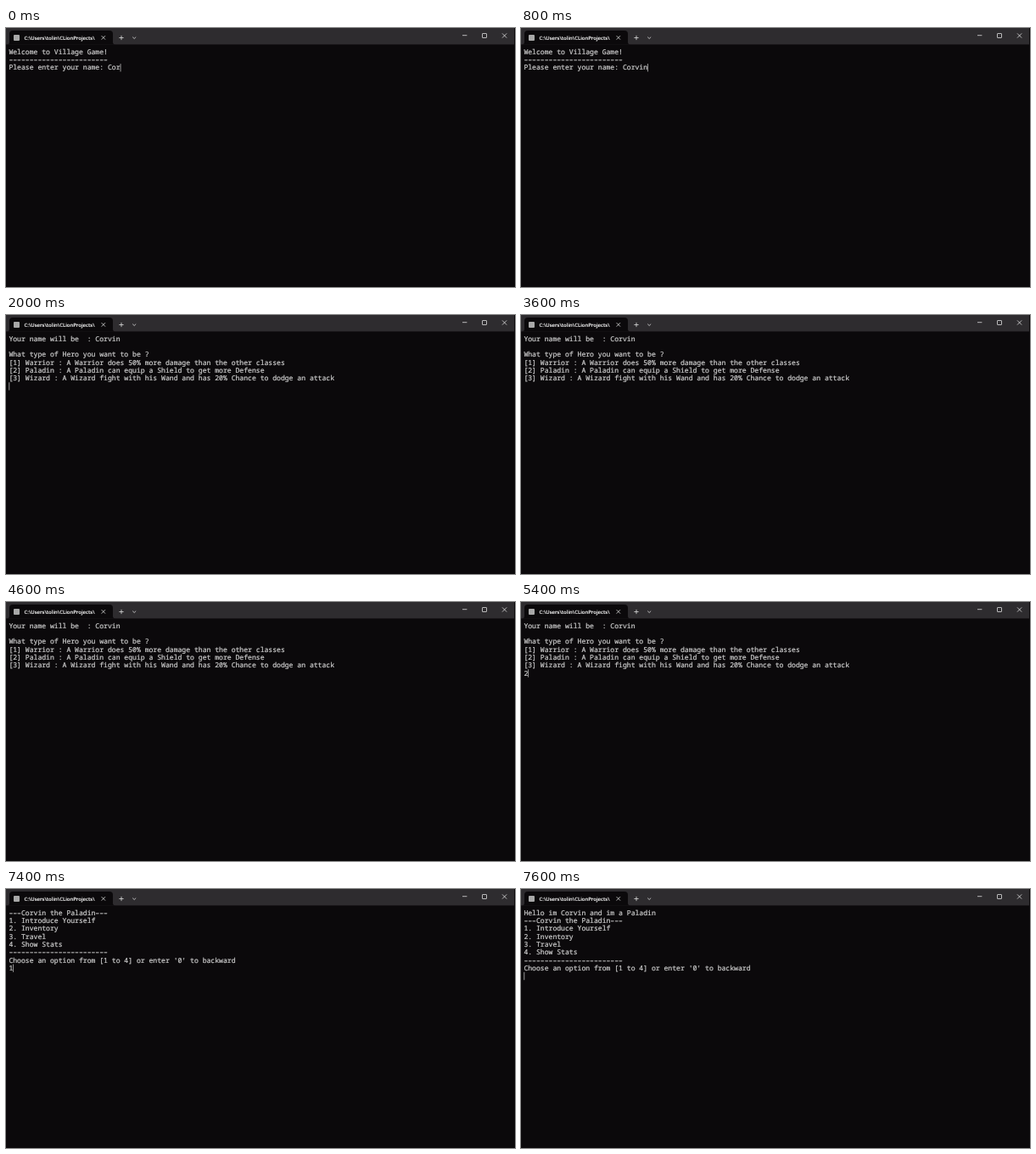
Animation, 600 px wide and 305 px high, one loop 8000 ms. Source, as an HTML page:

```html
<!DOCTYPE html>
<html lang="en">
<head>
<meta charset="utf-8">
<title>Terminal</title>
<style>
  html, body { margin: 0; width: 100%; height: 100%; overflow: hidden; background: #0b090b; }
  svg { display: block; width: 100%; height: 100%; }
  text { white-space: pre; text-rendering: geometricPrecision; }
  #screen text {
    font: 8.1px "Noto Sans Mono", "DejaVu Sans Mono", monospace;
    font-variant-ligatures: none;
    fill: #cccccc; stroke: #cccccc; stroke-width: .22;
  }
  #title {
    font: 600 5.95px "Open Sans", "Noto Sans", sans-serif;
    fill: #f8f8f8; stroke: #f8f8f8; stroke-width: .12;
  }
  .line { fill: none; stroke: #dedede; stroke-width: .8; }
</style>
</head>
<body>
<svg viewBox="0 0 600 305">
  <clipPath id="tabClip"><rect x="20" y="4" width="85" height="15"/></clipPath>
  <rect width="600" height="305" fill="#0b090b"/>
  <rect width="599" height="19.4" fill="#2e2c2f"/>
  <path d="M1 19.5Q4 19.5 4 16.5V7Q4 3 8 3H122Q126 3 126 7V16.5Q126 19.5 129 19.5Z" fill="#0b090b"/>
  <rect x="9" y="8" width="7" height="7" rx="1" fill="#a8a8a8"/>
  <g clip-path="url(#tabClip)"><text id="title" x="21.6" y="13.8">C:\Users\tolin\CLionProjects\</text></g>
  <path class="line" d="M112.6 9.2l4.4 4.4m0-4.4l-4.4 4.4"/>
  <path class="line" d="M133.4 11.5h5.2M136 8.9v5.2"/>
  <path class="line" d="M149.2 10.6l2 1.9l2-1.9"/>
  <path class="line" d="M538 8.7h5.4"/>
  <rect class="line" x="561.5" y="6.5" width="5" height="5" rx=".4"/>
  <path class="line" d="M585 6.4l5.2 5.2m0-5.2l-5.2 5.2"/>
  <g id="screen"></g>
  <rect id="caret" width=".8" height="9.3" fill="#b8b8b8"/>
</svg>
<script>
const LEFT = 3.4, TOP = 23.5, BASE = 7.3, CELL = 4.86, ROW = 9.3;
const LOOP = 8000;
const hero = "Corvin";
const dashes = n => "–".repeat(n);

const welcome = n => [
  "Welcome to Village Game!",
  dashes(24),
  "Please enter your name: " + hero.slice(0, n)
];
const classes = typed => [
  "Your name will be  : " + hero,
  "",
  "What type of Hero you want to be ?",
  "[1] Warrior : A Warrior does 50% more damage than the other classes",
  "[2] Paladin : A Paladin can equip a Shield to get more Defense",
  "[3] Wizard : A Wizard fight with his Wand and has 20% Chance to dodge an attack",
  typed
];
const menu = typed => [
  `${dashes(3)}${hero} the Paladin${dashes(3)}`,
  "1. Introduce Yourself",
  "2. Inventory",
  "3. Travel",
  "4. Show Stats",
  dashes(24),
  "Choose an option from [1 to 4] or enter '0' to backward",
  typed
];
const intro = [`Hello im ${hero} and im a Paladin`, ...menu("")];

// start time, lines on screen, caret visible
const steps = [
  [0, welcome(3), true],
  [400, welcome(4), true],
  [600, welcome(5), true],
  [800, welcome(6), true],
  [1400, welcome(6), false],
  [1800, ["", "", "", ""], true],
  [2000, classes(""), true],
  [2600, classes(""), false],
  [3000, classes(""), true],
  [3600, classes(""), false],
  [4200, classes(""), true],
  [4600, classes(""), false],
  [5200, classes(""), true],
  [5400, classes("2"), true],
  [5800, menu(""), true],
  [6400, menu(""), false],
  [7000, menu(""), true],
  [7400, menu("1"), true],
  [7600, intro, true]
];

const screenEl = document.getElementById("screen");
const caret = document.getElementById("caret");
let shown = null;

function textRow(line, i) {
  const el = document.createElementNS(screenEl.namespaceURI, "text");
  el.setAttribute("x", LEFT);
  el.setAttribute("y", TOP + BASE + i * ROW);
  el.textContent = line;
  return el;
}

function show(step) {
  const [, lines, on] = step;
  const last = lines.length - 1;
  screenEl.replaceChildren(...lines.map(textRow));
  caret.setAttribute("x", LEFT + lines[last].length * CELL);
  caret.setAttribute("y", TOP + last * ROW);
  caret.setAttribute("visibility", on ? "visible" : "hidden");
  shown = step;
}

const origin = performance.now();
function tick() {
  const t = (performance.now() - origin) % LOOP;
  const step = steps.findLast(s => s[0] <= t) || steps[0];
  if (step !== shown) show(step);
  requestAnimationFrame(tick);
}
tick();
</script>
</body>
</html>
```
